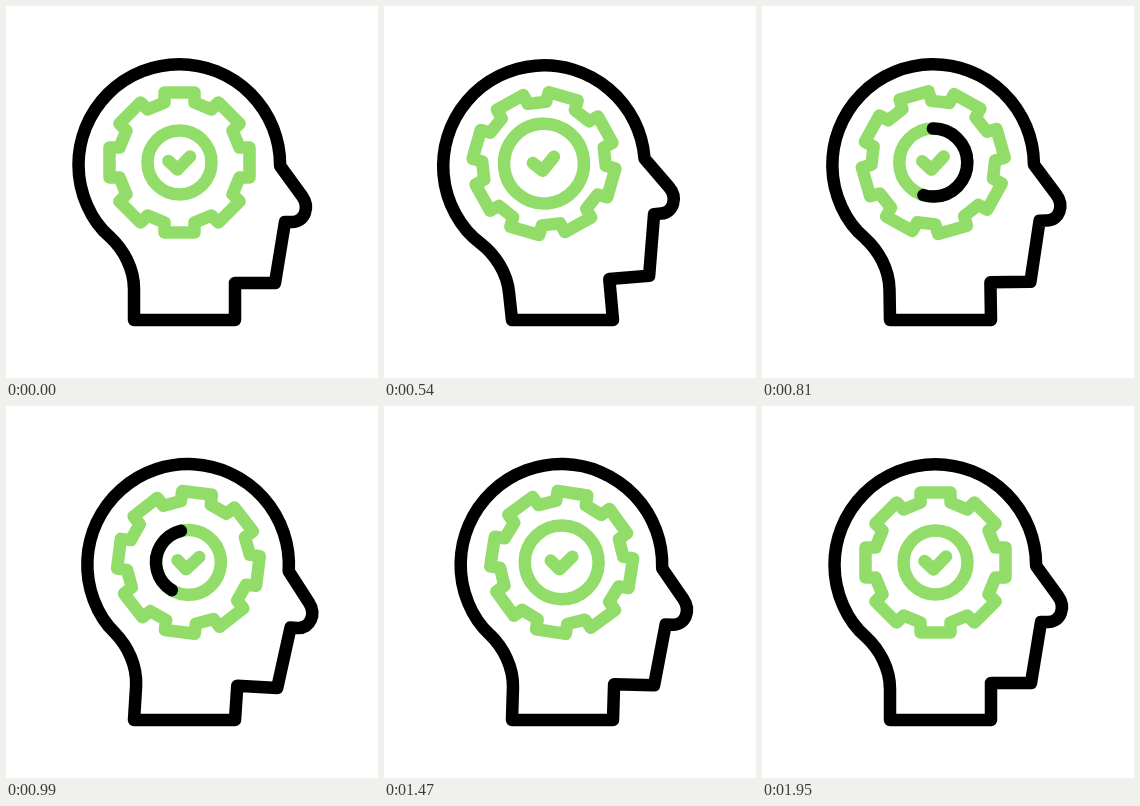
Write an HTML page with a canvas that moves like this. It is 372x372 px and loops after 2250 ms.

```html
<!DOCTYPE html>
<html>
<head>
<meta charset="utf-8">
<style>
html, body { margin: 0; height: 100%; overflow: hidden; background: #fff; }
canvas { display: block; width: 100vw; height: 100vh; }
</style>
</head>
<body>
<canvas id="stage" width="372" height="372"></canvas>
<script>
const ctx = document.getElementById('stage').getContext('2d');
const LOOP = 2250, MOVE = 1950, STEP = 30;
const GREEN = '#92dc69', BLACK = '#000';
const RAD = Math.PI / 180;

const clamp = x => Math.min(1, Math.max(0, x));

// S-curve from 0 to 1; power sets steepness, bias below 1 makes it arrive earlier
function ease(t, from, to, power = 2, bias = 1) {
  const x = clamp((t - from) / (to - from));
  const a = x ** power;
  return a / (a + bias * (1 - x) ** power);
}

function headTilt(t) {
  const back = -4.8, front = 4.05;
  if (t < 490) return back * ease(t, 0, 490);
  if (t < 1160) return back + (front - back) * ease(t, 490, 1160);
  return front * (1 - ease(t, 1160, MOVE, 2.4, 0.2));
}

function tilt(deg) {
  ctx.translate(180, 320);
  ctx.rotate(deg * RAD);
  ctx.translate(-180, -320);
}

function stroke(color) {
  ctx.strokeStyle = color;
  ctx.stroke();
}

// The neck base stays put while the rest of the outline tilts.
function drawHead(deg) {
  ctx.save();
  ctx.beginPath();
  ctx.moveTo(229, 314);
  ctx.lineTo(128, 314);
  tilt(deg);
  ctx.lineTo(128, 283);
  ctx.bezierCurveTo(128, 262, 117, 243, 104, 231);
  ctx.bezierCurveTo(85, 215, 72.5, 187, 72.5, 159);
  ctx.arc(173.3, 159, 100.8, Math.PI, 2 * Math.PI);
  ctx.lineTo(274.2, 160);
  ctx.lineTo(296, 190);
  ctx.bezierCurveTo(304, 201, 299, 216, 286, 216);
  ctx.lineTo(279, 216);
  ctx.lineTo(269, 277);
  ctx.lineTo(229, 277);
  ctx.restore();
  ctx.closePath();
  stroke(BLACK);
}

function drawGear(deg) {
  ctx.save();
  ctx.rotate(deg * RAD);
  ctx.beginPath();
  for (let i = 0; i < 8; i++) {
    ctx.lineTo(-15, -60);
    ctx.lineTo(-15, -70);
    ctx.lineTo(15, -70);
    ctx.lineTo(15, -60);
    ctx.rotate(45 * RAD);
  }
  ctx.closePath();
  stroke(GREEN);
  ctx.restore();
}

function drawRing(t) {
  const beat = Math.sin(2 * Math.PI * clamp((t - 185) / 1500)) ** 2;
  const radius = 32 + 8 * beat;
  ctx.beginPath();
  ctx.arc(0, 0, radius, 0, 2 * Math.PI);
  stroke(GREEN);

  // dark arc sweeping clockwise, its tail catching up with its head
  const head = -90 + 0.81 * (t - 566);
  const tail = -90 + 1.154 * Math.max(0, t - 810);
  if (t > 566 && head > tail) {
    ctx.beginPath();
    ctx.arc(0, 0, radius, tail * RAD, head * RAD);
    stroke(BLACK);
  }
}

function drawCheck() {
  ctx.beginPath();
  ctx.moveTo(-11, -1.5);
  ctx.lineTo(-2, 7);
  ctx.lineTo(10.5, -6);
  stroke(GREEN);
}

function draw(now) {
  const t = Math.min(MOVE, Math.floor(now % LOOP / STEP) * STEP);
  const deg = headTilt(t);
  ctx.fillStyle = '#fff';
  ctx.fillRect(0, 0, 372, 372);
  ctx.lineWidth = 12.5;
  ctx.lineCap = ctx.lineJoin = 'round';
  drawHead(deg);
  ctx.save();
  tilt(deg);
  ctx.translate(173.5, 156.5);
  drawGear(-135 * ease(t, 0, MOVE, 2.1, 0.607));
  drawRing(t);
  drawCheck();
  ctx.restore();
}

let start;
function tick(now) {
  start ??= now;
  draw(now - start);
  requestAnimationFrame(tick);
}
requestAnimationFrame(tick);
</script>
</body>
</html>
```
